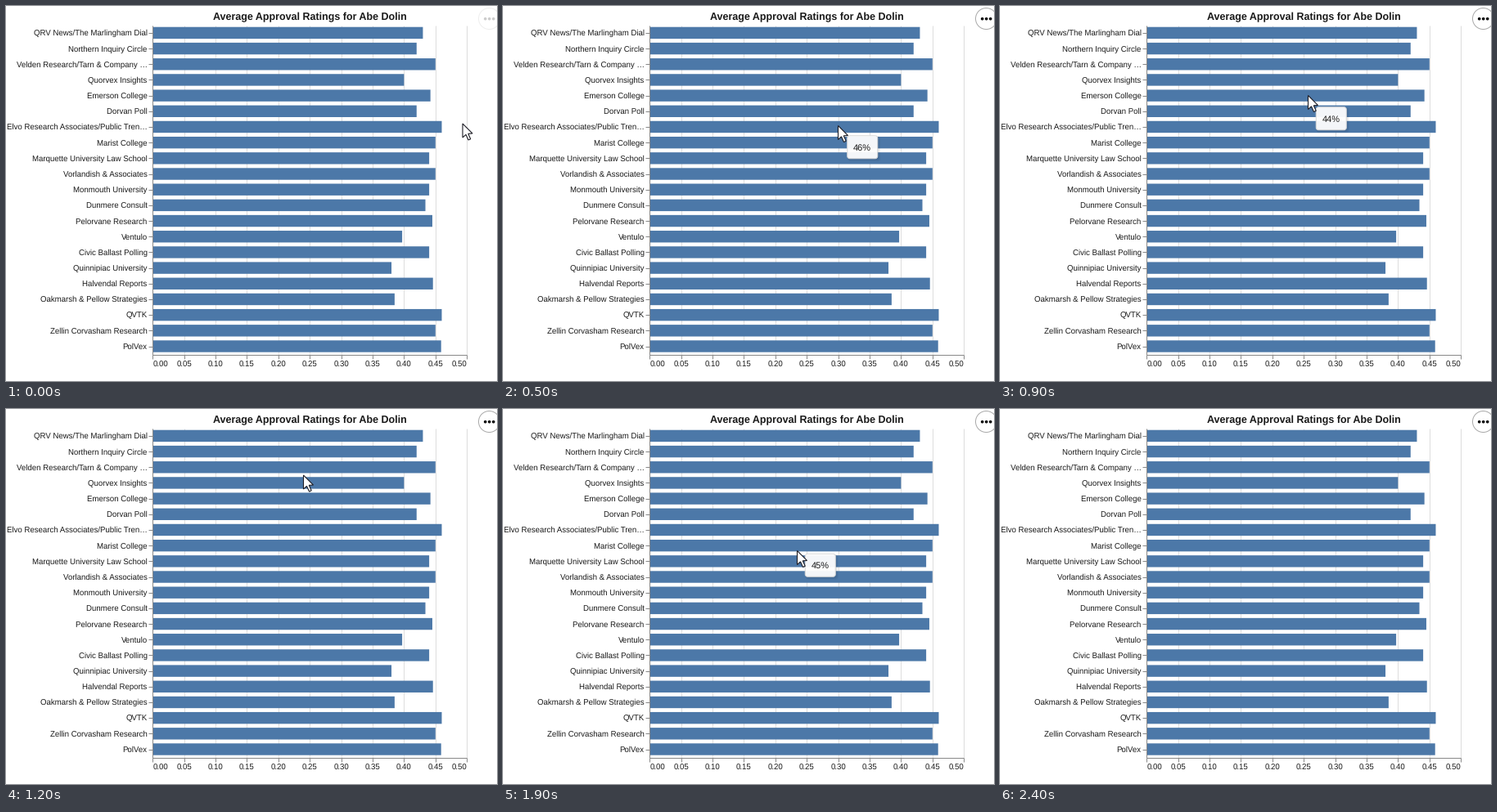
Write a matplotlib script that moves like this. It is 600 px wide and 459 px high and loops after 2500 ms.

```python
import numpy as np
import matplotlib.pyplot as plt
from matplotlib.animation import FuncAnimation
from matplotlib.patches import Circle, FancyBboxPatch, Polygon, Rectangle

plt.rcParams.update({"font.family": "Liberation Sans", "text.hinting": "none"})

W, H, DPI = 600, 459, 72          # at 72 dpi one point is one pixel
FRAMES, STEP = 25, 100            # 25 x 100 ms
X0, TOP, BOTTOM = 179.2, 24, 426.5
UNIT = 768                        # pixels per 1.0 on the x axis
ROW0, PITCH, BAR_H = 32.9, 19.18, 14.4
LAG = 0.05                        # the tooltip trails the pointer
INK = "#1a1a1a"

RATINGS = [
    ("QRV News/The Marlingham Dial", 0.43),
    ("Northern Inquiry Circle", 0.42),
    ("Velden Research/Tarn & Company \u2026", 0.45),
    ("Quorvex Insights", 0.40),
    ("Emerson College", 0.442),
    ("Dorvan Poll", 0.42),
    ("Elvo Research Associates/Public Tren\u2026", 0.46),
    ("Marist College", 0.45),
    ("Marquette University Law School", 0.44),
    ("Vorlandish & Associates", 0.45),
    ("Monmouth University", 0.44),
    ("Dunmere Consult", 0.434),
    ("Pelorvane Research", 0.445),
    ("Ventulo", 0.397),
    ("Civic Ballast Polling", 0.44),
    ("Quinnipiac University", 0.38),
    ("Halvendal Reports", 0.446),
    ("Oakmarsh & Pellow Strategies", 0.385),
    ("QVTK", 0.46),
    ("Zellin Corvasham Research", 0.45),
    ("PolVex", 0.459),
]

# pointer path: seconds, x, y
PATH = np.array([
    (0.0, 558, 144), (0.3, 440, 151), (0.4, 412, 151), (0.5, 409.5, 146.5),
    (0.8, 376, 118), (0.9, 376.5, 109.5), (1.1, 366, 80), (1.2, 363.5, 81),
    (1.3, 363, 86), (1.6, 360.5, 124), (1.8, 359, 161), (1.9, 359.5, 173.5),
    (2.0, 363, 186), (2.1, 392, 198), (2.2, 462, 207), (2.4, 650, 218),
])
ARROW = np.array([(0, 0), (0, 17), (4, 13.4), (7, 20), (9.7, 18.8),
                  (6.8, 12.3), (12, 12)])

fig = plt.figure(figsize=(W / DPI, H / DPI), dpi=DPI, facecolor="white")
ax = fig.add_axes([0, 0, 1, 1])
ax.set(xlim=(0, W), ylim=(H, 0))
ax.axis("off")


def line(x1, y1, x2, y2, color="#888888", z=3):
    ax.plot([x1, x2], [y1, y2], color=color, lw=1, zorder=z,
            solid_capstyle="butt")


def label(x, y, text, size=9.6, ha="right", **kw):
    return ax.text(x, y, text, fontsize=size, ha=ha, va="baseline",
                   color=INK, **kw)


def draw_chart():
    label(371, 17, "Average Approval Ratings for Abe Dolin", 12.5,
          "center", weight="bold")
    for i in range(11):
        x = X0 + i * 0.05 * UNIT
        line(x, TOP, x, BOTTOM, "#dddddd", 1)
        line(x, BOTTOM, x, BOTTOM + 5)
        ha = "left" if i == 0 else "right" if i == 10 else "center"
        label(x, 442, f"{i * 0.05:.2f}", ha=ha)
    for i, (name, value) in enumerate(RATINGS):
        y = ROW0 + i * PITCH
        ax.add_patch(Rectangle((X0, y - BAR_H / 2), value * UNIT, BAR_H,
                               fc="#4c78a8", lw=0, zorder=2, snap=False))
        line(X0 - 5, y, X0, y)
        label(X0 - 6.5, y + 3.4, name)
    line(X0, TOP, X0, BOTTOM)
    line(X0, BOTTOM, X0 + 0.5 * UNIT, BOTTOM)


def make_button():
    ring = Circle((590.5, 15.5), 13, fc="white", ec="#aaaaaa", lw=1, zorder=4)
    dots = [Circle((590.7 + dx, 15.7), 1.8, fc="black", lw=0, zorder=5)
            for dx in (-5, 0, 5)]
    return [ax.add_patch(p) for p in (ring, *dots)]


def rounded(**kw):
    return ax.add_patch(FancyBboxPatch(
        (0, 0), 37, 28, boxstyle="round,pad=0,rounding_size=3", **kw))


def pointer(t):
    return np.array([np.interp(t, PATH[:, 0], PATH[:, k]) for k in (1, 2)])


def hovered(x, y):
    """Value of the bar under the point, or None."""
    i = int(round((y - ROW0) / PITCH))
    if abs(y - ROW0 - i * PITCH) > BAR_H / 2:
        return None
    value = RATINGS[i][1]
    return value if X0 <= x <= X0 + value * UNIT else None


draw_chart()
button = make_button()
shadows = [rounded(fc="black", alpha=0.035, lw=0, zorder=6) for _ in range(3)]
box = rounded(fc=(1, 1, 1, 0.95), ec="#d9d9d9", lw=1, zorder=7)
tip_text = label(0, 0, "", 11, "center", zorder=8)
arrow = ax.add_patch(Polygon(ARROW, fc="white", ec="#1c1c24", lw=1.1,
                             joinstyle="miter", zorder=9))


def update(n):
    t = n * STEP / 1000
    arrow.set_xy(pointer(t) + ARROW)

    fade = 0.2 + 0.8 * min(t / 0.4, 1) ** 1.4
    for part in button:
        part.set_alpha(fade)

    x, y = pointer(max(t - LAG, 0))
    value = hovered(x, y)
    for part in (*shadows, box, tip_text):
        part.set_visible(value is not None)
    if value is not None:
        x, y = x + 10, y + 10
        box.set_bounds(x, y, 37, 28)
        for k, shade in enumerate(shadows, 1):
            shade.set_bounds(x + 0.5, y + 0.5, 37 + k, 28 + k)
        tip_text.set_position((x + 18.5, y + 18))
        tip_text.set_text(f"{value:.0%}")
    return [arrow, *button, *shadows, box, tip_text]


anim = FuncAnimation(fig, update, frames=FRAMES, interval=STEP,
                     repeat=True, repeat_delay=0, blit=False)
plt.show()
```
